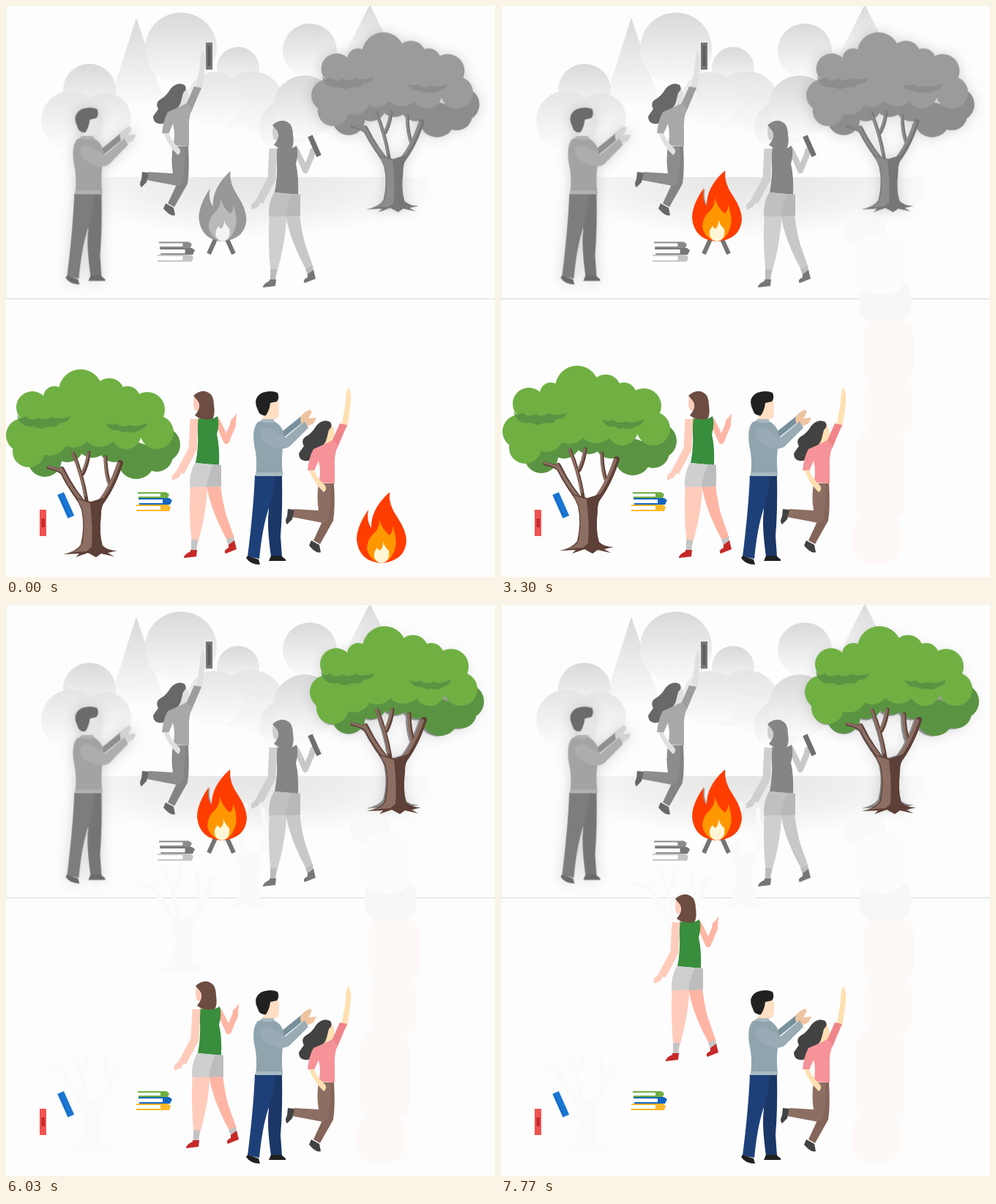
Recreate the animation shown at these times as an HTML page. Size 668 by 781 pixels, loop 8 s.

```html
<!DOCTYPE html>
<html lang="en">
<head>
<meta charset="utf-8">
<title>Campfire puzzle</title>
<style>
html, body { margin: 0; width: 100%; height: 100%; overflow: hidden; background: #fdfdfd; }
svg { display: block; width: 100vw; height: 100vh; }

/* Colour palettes, inherited by each reused figure */
.tree { --leaf: #70b043; --shade: #5a9442; --bark: #8d6e63; --dark: #5d4037; }
.walker { --hair: #6d4c41; --skin: #ffccbc; --skin2: #ffb5a3; --top: #388e3c; --short: #cfcfcf; --short2: #bdbdbd; --shoe: #c62828; --sock: #c4c4c4; }
.man { --hair: #212121; --skin: #ffdfc4; --hand: #eec4a0; --knit: #90a4ae; --arm: #9aabb5; --back: #78909c; --hem: #a9b9c1; --pants: #1e4079; --pants2: #1b3768; --shoe: #212121; }
.jumper { --hair: #424242; --skin: #ffe0b2; --top: #f59398; --top2: #ef858b; --pants: #8d6e63; --pants2: #84655a; --shoe: #424242; }
.fire { --outer: #ff3d00; --mid: #ff9800; --core: #fff6d6; }
.books { --b1: #6fae44; --b2: #1565c0; --b3: #fbb829; }

.grey.tree { --leaf: #9b9b9b; --shade: #8d8d8d; --bark: #8c8c8c; --dark: #777; }
.grey.walker { --hair: #858585; --skin: #cfcfcf; --skin2: #c8c8c8; --top: #858585; --short: #c0c0c0; --short2: #b8b8b8; --shoe: #777; --sock: #bbb; }
.grey.man { --hair: #6b6b6b; --skin: #e6e6e6; --hand: #d2d2d2; --knit: #a3a3a3; --arm: #adadad; --back: #8f8f8f; --hem: #b2b2b2; --pants: #7d7d7d; --pants2: #757575; --shoe: #6a6a6a; }
.grey.jumper { --hair: #686868; --skin: #e0e0e0; --top: #a8a8a8; --top2: #9d9d9d; --pants: #8c8c8c; --pants2: #848484; --shoe: #686868; }
.grey.fire { --outer: #989898; --mid: #b9b9b9; --core: #f3f3f3; }
.grey.books { --b1: #8b8b8b; --b2: #777; --b3: #c4c4c4; }
.soft { filter: drop-shadow(0 0 9px rgba(0, 0, 0, .17)); }
.faint { --leaf: none; --shade: none; --bark: #fafafa; --dark: #fafafa; }

#fire, #tree, #walker { animation: 8s linear infinite; }
#fire { animation-name: fire; }
#tree { animation-name: tree; }
#walker { animation-name: walker; }
.trail { animation: 8s step-end infinite; }
.trail.a { animation-name: afterFire; }
.trail.b { animation-name: afterTree; }

@keyframes fire {
  0%, 18.4% { transform: none; }
  18.75% { transform: translate(1px, -8px); }
  20.6% { transform: translate(5px, -62px); }
  21.75% { transform: translate(16px, -150px); }
  22.5% { transform: translate(17px, -235px); }
  23.4% { transform: translate(11px, -330px); }
  24.4% { transform: translate(-15px, -430px); }
  25.5%, 25.8% { transform: translate(-143px, -463px); }
  27% { transform: translate(-194px, -455px); }
  28.5%, 28.8% { transform: translate(-212px, -447px); }
  30% { transform: translate(-220px, -442px); }
  31.1%, 100% { transform: translate(-218px, -440px); }
}
@keyframes tree {
  0%, 40.9% { transform: none; }
  41.25%, 41.5% { transform: translate(2px, -5px); }
  42.3% { transform: translate(45px, -110px); }
  43.1% { transform: translate(125px, -250px); }
  43.9% { transform: translate(215px, -338px); }
  44.6% { transform: translate(370px, -430px); }
  45.4%, 57.4% { transform: translate(468px, -461px); }
  57.75%, 58% { transform: translate(466px, -461px); }
  60% { transform: translate(437px, -465px); }
  62.6%, 100% { transform: translate(415px, -468px); }
}
@keyframes walker {
  0%, 75% { transform: none; }
  75.375%, 75.6% { transform: translate(3px, -12px); }
  77% { transform: translate(30px, -120px); }
  78.7% { transform: translate(88px, -300px); }
  80% { transform: translate(117px, -372px); }
  81%, 85.5% { transform: translate(103px, -381px); }
  85.9% { transform: translate(92px, -389px); }
  86.6%, 88.5% { transform: translate(78px, -393px); }
  88.875%, 89.1% { transform: translate(82px, -392px); }
  90% { transform: translate(90px, -368px); }
  91.2% { transform: translate(42px, -270px); }
  92.4% { transform: translate(-12px, -160px); }
  93% { transform: translate(-29px, -118px); }
  93.4%, 94.9% { transform: translate(-24px, -105px); }
  96% { transform: translate(-22px, -119px); }
  97.1%, 100% { transform: translate(-18px, -131px); }
}
@keyframes afterFire { 0% { opacity: 0; } 24.5%, 100% { opacity: 1; } }
@keyframes afterTree { 0% { opacity: 0; } 44.6%, 100% { opacity: 1; } }
</style>
</head>
<body>
<svg viewBox="0 0 668 781" preserveAspectRatio="none">
<defs>
  <linearGradient id="mist" x2="0" y2="1">
    <stop stop-color="#d9d9d9"/><stop offset="1" stop-color="#fbfbfb"/>
  </linearGradient>
  <linearGradient id="haze" x2="0" y2="1">
    <stop stop-color="#e5e5e5"/><stop offset="1" stop-color="#fdfdfd"/>
  </linearGradient>
  <radialGradient id="ground" cx=".5" cy="0" r=".55">
    <stop stop-color="#e4e4e4"/><stop offset=".6" stop-color="#f0f0f0"/><stop offset="1" stop-color="#fdfdfd"/>
  </radialGradient>

  <g id="treeShape">
    <g fill="var(--shade)">
      <circle cx="53" cy="621" r="23"/><circle cx="28" cy="611" r="18"/><circle cx="84" cy="602" r="22"/>
      <circle cx="118" cy="596" r="22"/><circle cx="148" cy="602" r="22"/><circle cx="178" cy="622" r="25"/>
      <circle cx="206" cy="615" r="22"/><circle cx="214" cy="600" r="24"/>
    </g>
    <g fill="var(--leaf)">
      <circle cx="36" cy="549" r="22"/><circle cx="66" cy="535" r="15"/><circle cx="102" cy="527" r="30"/>
      <circle cx="141" cy="530" r="21"/><circle cx="166" cy="537" r="17"/><circle cx="193" cy="552" r="24"/>
      <circle cx="23" cy="587" r="23"/><circle cx="31" cy="609" r="22"/><circle cx="60" cy="591" r="24"/>
      <circle cx="92" cy="581" r="23"/><circle cx="128" cy="578" r="25"/><circle cx="164" cy="585" r="21"/>
      <circle cx="206" cy="583" r="23"/><path d="M38 540H200V590H30Z"/>
    </g>
    <g fill="var(--shade)">
      <path d="M15 559q5 9 12 2q8 8 18 2q10 5 18-1q10 5 25-1q-3 10-14 9q-5 8-17 5q-10 6-18 0q-20 3-24-16z"/>
      <path d="M136 570q8 5 15 1q8 7 17 2q10 4 25-3q-2 9-11 10q-8 6-16 2q-8 3-13-2q-12 2-17-10z"/>
    </g>
    <g fill="none" stroke-linecap="round">
      <g stroke="var(--dark)">
        <path stroke-width="8" d="M114 690Q92 667 76 634M120 690Q142 668 156 625"/>
        <path stroke-width="5" d="M82 643Q73 633 58 631M110 676Q104 640 92 612M105 640Q112 626 113 611M143 658Q136 640 136 617"/>
      </g>
      <g stroke="var(--bark)">
        <path stroke-width="4" d="M110 684Q91 665 75 633M121 684Q139 668 154 626"/>
        <path stroke-width="3" d="M80 641Q73 633 58 630M108 670Q103 640 91 611M104 638Q110 626 112 611M141 656Q135 640 135 617"/>
      </g>
    </g>
    <path fill="var(--dark)" d="M78 750Q96 746 102 737Q108 712 103 689Q100 680 94 672L116 678L138 671Q129 685 130 697Q127 722 132 738Q139 745 152 745L139 748L148 753L130 749L123 754L112 748L95 754L100 749Z"/>
    <path fill="var(--bark)" d="M86 748Q100 745 104 736Q109 712 104 688L97 674L115 680Q119 715 117 740L110 746Q100 746 86 748Z"/>
  </g>

  <g id="walkerShape">
    <path fill="none" stroke="var(--skin2)" stroke-width="8" stroke-linejoin="round" stroke-linecap="round" d="M288 567Q295 580 301 595L310 573"/>
    <path fill="var(--skin2)" d="M306 576Q306 564 310 564L315 557L314 571L312 580ZM274 655H293Q296 680 301 697L312 728L304 734Q280 692 274 655Z"/>
    <path fill="var(--skin)" d="M252 655H275Q275 690 261 738H254Q249 690 252 655ZM258 531Q254 543 258 553L264 554L262 566L281 565L276 530Z"/>
    <path fill="var(--hair)" d="M256 533Q267 523 277 529Q284 533 284 546Q286 559 282 565Q270 569 258 560Q268 548 262 540Z"/>
    <path fill="var(--top)" d="M260 566Q264 563 270 565Q280 567 289 561Q292 572 288 586Q292 602 291 628L259 625Q263 605 262 584Z"/>
    <path fill="none" stroke="var(--skin)" stroke-width="11" stroke-linejoin="round" d="M257 565Q256 585 255 606L238 638"/>
    <path fill="var(--skin)" d="M241 637L236 645L227 649L227 642L234 635Z"/>
    <path fill="var(--short)" d="M258 625L294 628V657L251 658Q250 640 258 625Z"/>
    <path fill="var(--short2)" d="M283 627L294 628V657L274 658Q277 638 283 627Z"/>
    <path fill="var(--sock)" d="M253 730H262L260 745H253ZM301 730L310 726L313 733L304 738Z"/>
    <path fill="var(--shoe)" d="M252 744H261L260 753L243 755Q243 750 252 746ZM304 737L312 731L315 743L300 749Q296 745 304 741Z"/>
  </g>

  <g id="manShape">
    <path fill="none" stroke="var(--back)" stroke-width="8" d="M376 588L407 563"/>
    <path fill="var(--hand)" d="M402 564Q404 557 415 552L418 555L413 564L424 563L420 571L409 576L403 571Z"/>
    <path fill="var(--skin)" d="M354 540L372 537Q374 552 372 562Q368 567 363 565L364 571H350Z"/>
    <path fill="var(--hair)" d="M343 550Q337 536 350 529Q362 525 371 529Q374 536 370 541L361 543Q360 553 355 560Q350 561 346 557Z"/>
    <path fill="var(--pants2)" d="M354 642H377Q378 690 375 725L377 753H362Q356 710 359 690Z"/>
    <path fill="var(--pants)" d="M340 642H367Q366 666 358 690Q350 715 346 756L330 753Q338 690 340 642Z"/>
    <path fill="var(--knit)" d="M344 569Q355 564 368 569Q380 576 380 592Q375 616 378 642L341 643Q344 620 339 600Q336 577 344 569Z"/>
    <path fill="var(--hem)" d="M341 638H378V643H341ZM347 567Q358 573 367 568L365 565H351Z"/>
    <path fill="var(--arm)" d="M349 580Q358 573 369 583L382 590L408 568L413 577L388 602Q378 609 365 603Q343 594 349 580Z"/>
    <path fill="var(--shoe)" d="M330 752L345 757L347 764Q334 764 328 755ZM362 752H376L382 757V759H359Z"/>
  </g>

  <g id="jumperShape">
    <path fill="var(--skin)" d="M458 576L463 548L465 528L468 521L471 530V542Q469 560 466 577ZM438 578L444 571Q450 580 448 591Q445 599 441 597L440 606H430Z"/>
    <path fill="var(--hair)" d="M424 574Q433 564 443 569Q447 575 441 580L438 592Q436 600 429 603Q427 612 421 613Q416 624 408 622Q400 621 400 612Q404 606 407 602Q402 593 411 588Q418 584 424 574Z"/>
    <path fill="var(--top2)" d="M444 598L456 571L466 573L452 606Z"/>
    <path fill="var(--top)" d="M420 606Q432 601 446 594L453 602Q448 615 449 630V653L427 652Q431 637 427 622L421 636L412 635Q414 616 420 606Z"/>
    <path fill="var(--pants2)" d="M434 653H448Q450 685 447 704L429 736L420 731L433 703Z"/>
    <path fill="var(--pants)" d="M427 653H444Q443 690 440 702Q436 708 428 706L391 699L394 688L427 690Q424 672 427 653Z"/>
    <path fill="var(--skin)" d="M414 635H421Q424 645 436 656Q439 662 434 665Q422 654 414 635Z"/>
    <path fill="var(--shoe)" d="M385 688L394 689L391 702L384 709Q380 705 384 698ZM417 731L428 737L430 747Q424 750 414 738Z"/>
  </g>

  <g id="fireShape">
    <path fill="var(--outer)" d="M524 665Q522 682 535 700Q547 718 547 732Q545 759 513 762Q482 760 479 730Q479 712 495 689Q492 704 499 714Q498 688 524 665Z"/>
    <path fill="var(--mid)" d="M510 702Q514 717 524 724Q529 719 528 711Q536 733 530 746Q525 760 513 762Q496 758 493 742Q494 728 503 721Q511 713 510 702Z"/>
    <path fill="var(--core)" d="M515 732Q517 740 523 745Q525 760 513 762Q502 760 503 749Q504 744 507 741Q509 744 511 745Q516 740 515 732Z"/>
  </g>

  <g id="booksShape">
    <path fill="var(--b1)" d="M180 665H219L223 668L221 673H181V671H210V667H180Z"/>
    <path fill="#fff" d="M181 667H211V671H181Z"/>
    <path fill="var(--b2)" d="M181 673H223L227 676L224 682H182V680H213V675H181Z"/>
    <path fill="#fff" d="M182 675H214V680H182Z"/>
    <path fill="var(--b3)" d="M178 682H221L225 685L223 691H178V689H210V684H178Z"/>
    <path fill="#fff" d="M179 684H211V689H179Z"/>
  </g>
</defs>

<rect width="668" height="781" fill="#fdfdfd"/>

<!-- Grey scene -->
<g fill="url(#mist)">
  <path d="M178 16L218 135H140Z"/>
  <path d="M497 -2L535 75H458Z"/>
  <circle cx="239" cy="58" r="49"/>
  <circle cx="114" cy="115" r="36"/>
  <circle cx="317" cy="85" r="29"/>
  <circle cx="415" cy="61" r="37"/>
</g>
<g fill="url(#haze)">
  <circle cx="89" cy="157" r="41"/><circle cx="136" cy="154" r="35"/>
  <circle cx="335" cy="135" r="46"/><circle cx="285" cy="128" r="38"/>
  <circle cx="380" cy="165" r="34"/>
</g>
<circle cx="408" cy="138" r="43" fill="url(#mist)"/>
<rect x="90" y="234" width="490" height="150" fill="url(#ground)"/>
<path fill="#fdfdfd" d="M148 234Q148 185 180 185Q210 185 210 234ZM258 234Q250 205 275 200Q282 165 315 165Q350 165 360 234Z"/>
<path d="M0 400.5H668" stroke="#e3e1da" stroke-width="1.5"/>
<path d="M.5 0V400" stroke="#eee"/>

<g class="trail a">
  <rect x="470" y="290" width="56" height="36" rx="18" fill="#f9f9f9"/>
  <rect x="490" y="375" width="70" height="58" rx="22" fill="#f7f7f7"/>
  <rect x="485" y="312" width="67" height="82" rx="24" fill="#fcfcfc"/>
  <g fill="#fef8f7">
    <rect x="496" y="429" width="68" height="88" rx="20"/><rect x="497" y="511" width="65" height="78" rx="22"/>
    <rect x="484" y="582" width="68" height="122" rx="24"/><rect x="479" y="698" width="68" height="64" rx="24"/>
  </g>
</g>
<g class="trail b faint">
  <use href="#treeShape" opacity=".6"/>
  <use href="#treeShape" x="125" y="-250"/>
  <use href="#treeShape" x="215" y="-338"/>
</g>

<g class="grey tree soft" transform="translate(417 -439.6) scale(.965 .957)"><use href="#treeShape"/></g>
<g class="grey man soft" transform="translate(-248 -399) scale(1.004 1.021)"><use href="#manShape"/></g>
<g class="grey jumper" transform="translate(-199 -461)"><use href="#jumperShape"/></g>
<rect x="273" y="50" width="9" height="37" fill="#777"/>
<rect x="275.5" y="54" width="4" height="28" fill="#5e5e5e"/>
<g class="grey walker" transform="translate(108 -370)"><use href="#walkerShape"/></g>
<rect x="418" y="176.5" width="7" height="30" fill="#6f6f6f" transform="rotate(-24 421.5 191.5)"/>
<path d="M286 319L277 339M302 319L311 339" stroke="#747474" stroke-width="6"/>
<g class="grey fire" transform="translate(-195 -432.5) scale(.957 .99)"><use href="#fireShape"/></g>
<g class="grey books" transform="translate(22 -369) scale(1.04)"><use href="#booksShape"/></g>

<!-- Coloured pieces -->
<rect x="46" y="689" width="9" height="36" fill="#ef5350"/>
<rect x="48.5" y="701" width="4.5" height="12" fill="#c62828"/>
<g transform="rotate(-24 81.5 683)">
  <rect x="77" y="665.5" width="9.5" height="35" fill="#1976d2"/>
  <path d="M79 668V698" stroke="#1565c0"/>
</g>
<g class="books"><use href="#booksShape"/></g>
<g class="man"><use href="#manShape"/></g>
<g class="jumper"><use href="#jumperShape"/></g>
<g id="tree" class="tree"><use href="#treeShape"/></g>
<g id="fire" class="fire"><use href="#fireShape"/></g>
<g id="walker" class="walker"><use href="#walkerShape"/></g>
</svg>
</body>
</html>
```
